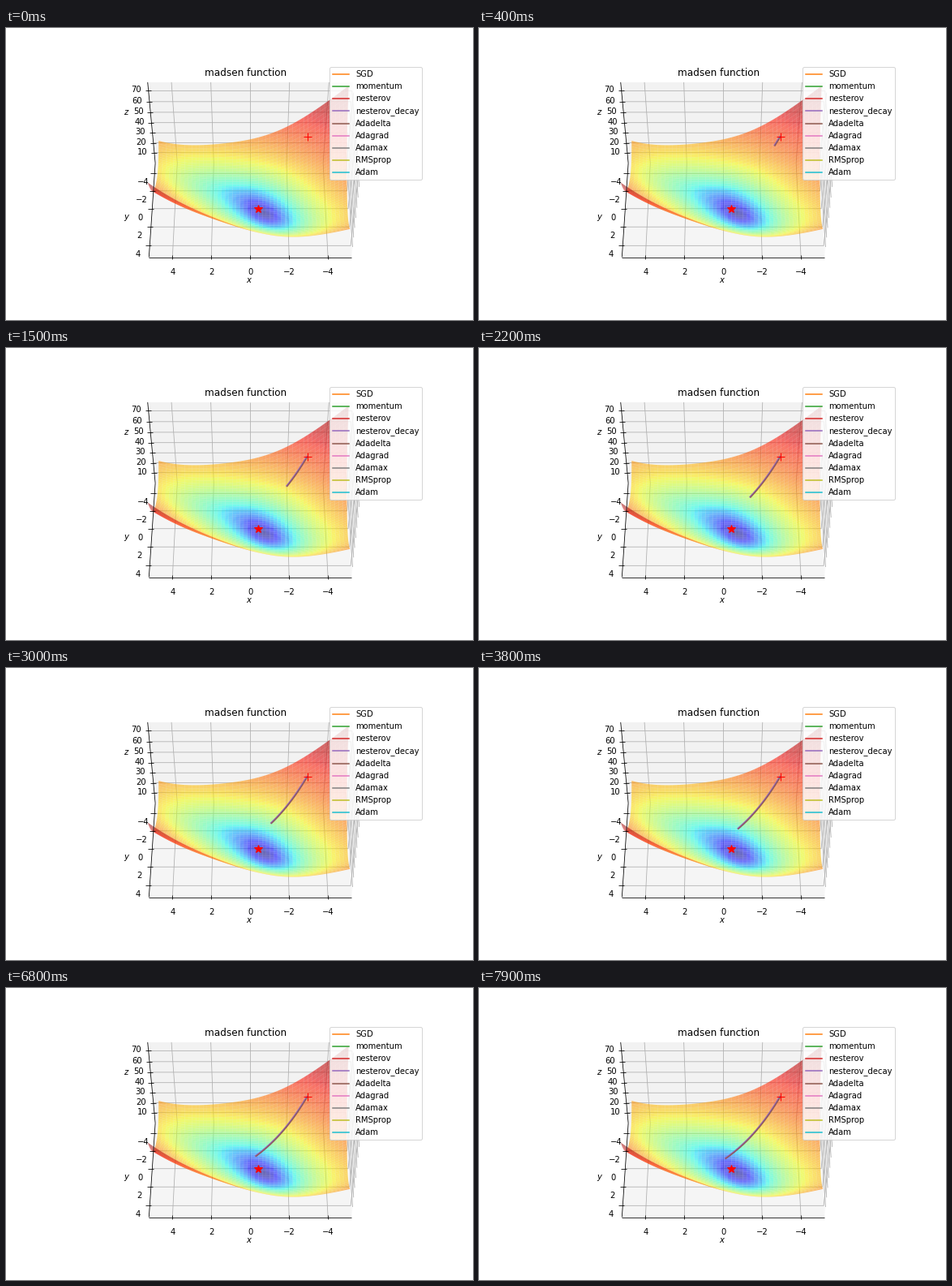
Recreate the animation shown at these times as a matplotlib script. Size 576 by 360 pixels, loop 8000 ms.

```python
import numpy as np
import matplotlib.pyplot as plt
from matplotlib.animation import FuncAnimation
from matplotlib.collections import LineCollection, PolyCollection
from matplotlib.colors import LogNorm
from matplotlib.lines import Line2D

W, H, DPI = 576, 360, 72
FRAMES, STEP = 80, 100
plt.rcParams["font.family"] = "DejaVu Sans"
plt.rcParams["mathtext.fontset"] = "dejavusans"


def madsen(x, y):
    return x * x + y * y + x * y + np.sin(x) + np.cos(y)


# Perspective camera looking along the y axis from 50 degrees above
ELEV = np.radians(50)
COS, SIN = np.cos(ELEV), np.sin(ELEV)
Z_LO, Z_HI = 0.6, 76.2
EDGE = 5 + 10 / 48
BOTTOM = Z_LO - (Z_HI - Z_LO) / 48
TOP = Z_HI + (Z_HI - Z_LO) / 48


def project(x, y, z):
    """Data point to stage pixels and distance from the camera."""
    u, v = -np.asarray(x) / 10, np.asarray(y) / 10
    w = (np.asarray(z) - Z_LO) / (Z_HI - Z_LO) - 0.5
    depth = 10 - (v * COS + w * SIN)
    px = 301.2 + 2413 * u / depth
    py = 175.43 - 1469.2 * (w * COS - v * SIN) / depth
    return px, py, depth


def line3(*points):
    return [project(*p)[:2] for p in points]


fig = plt.figure(figsize=(W / DPI, H / DPI), dpi=DPI, facecolor="white")
ax = fig.add_axes([0, 0, 1, 1])
ax.set_xlim(0, W)
ax.set_ylim(H, 0)
ax.axis("off")

# Panes
L, R, BACK, FRONT = EDGE, -EDGE, -EDGE, EDGE
panes = [
    line3((L, BACK, TOP), (R, BACK, TOP), (R, BACK, BOTTOM), (L, BACK, BOTTOM)),
    line3((L, BACK, BOTTOM), (R, BACK, BOTTOM), (R, FRONT, BOTTOM), (L, FRONT, BOTTOM)),
    line3((R, BACK, TOP), (R, FRONT, TOP), (R, FRONT, BOTTOM), (R, BACK, BOTTOM)),
]
greys = [(g, g, g, 0.5) for g in (0.9, 0.925, 0.95)]
ax.add_collection(PolyCollection(panes, facecolors=greys, edgecolors="none", zorder=1))

# Grid
xy_ticks = range(-4, 5, 2)
z_ticks = range(10, 71, 10)
grid = [line3((x, BACK, TOP), (x, BACK, BOTTOM), (x, FRONT, BOTTOM)) for x in xy_ticks]
grid += [line3((L, y, BOTTOM), (R, y, BOTTOM), (R, y, TOP)) for y in xy_ticks]
grid += [line3((L, BACK, z), (R, BACK, z), (R, FRONT, z)) for z in z_ticks]
ax.add_collection(LineCollection(grid, colors="#b0b0b0", linewidths=0.8, zorder=2))

# Surface, painted from far to near
side = np.linspace(-5, 4.9, 51)
gx, gy = np.meshgrid(side, side)
gz = madsen(gx, gy)
px, py, depth = project(gx, gy, gz)


def corners(a):
    return np.stack([a[:-1, :-1], a[:-1, 1:], a[1:, 1:], a[1:, :-1]], -1).reshape(-1, 4)


order = np.argsort(-corners(depth).mean(1))
quads = np.stack([corners(px), corners(py)], -1)[order]
level = LogNorm(Z_LO, Z_HI)(corners(gz).mean(1)[order])
ax.add_collection(PolyCollection(
    quads, facecolors=plt.cm.jet(level, alpha=0.57), edgecolors="none",
    linewidths=0, antialiaseds=True, zorder=3))

# Axis lines, ticks and labels
axes = [line3((L, BACK, TOP), (L, BACK, BOTTOM)),
        line3((L, BACK, BOTTOM), (L, FRONT, BOTTOM)),
        line3((L, FRONT, BOTTOM), (R, FRONT, BOTTOM))]


def label(x, y, text, size=10):
    ax.text(x, y, text, fontsize=size, ha="center", va="center", zorder=6)


def minus(n):
    return str(n).replace("-", "\u2212")


for x in xy_ticks:
    tx, ty, _ = project(x, FRONT, BOTTOM)
    axes.append([(tx, ty - 3), (tx, ty + 2)])
    label(tx, 300.5, minus(x))
for y in xy_ticks:
    tx, ty, _ = project(L, y, BOTTOM)
    axes.append([(tx - 5, ty), (tx + 2, ty)])
    label(tx - 14.5, ty + 10.8, minus(y))
for z in z_ticks:
    tx, ty, _ = project(L, BACK, z)
    axes.append([(tx - 4, ty), (tx + 3, ty)])
    label(tx - 15, ty - 1, z)
ax.add_collection(LineCollection(axes, colors="black", linewidths=0.8, zorder=4))
label(300.5, 311, "$x$")
label(149, 234.5, "$y$")
label(149, 104, "$z$")
ax.text(295.2, 58.9, "madsen function", fontsize=12, ha="center", zorder=6)

# Start and optimum
start = project(-3, -4, madsen(-3, -4))[:2]
ax.plot(*start, "r+", ms=10, mew=1, zorder=5.5)
ax.plot(311, 223, "r*", ms=10, zorder=5.5)

# Legend
names = ["SGD", "momentum", "nesterov", "nesterov_decay", "Adadelta",
         "Adagrad", "Adamax", "RMSprop", "Adam"]
handles = [Line2D([], [], color=f"C{i}") for i in range(1, 10)]
legend = ax.legend(handles, names, loc="upper right", fontsize=10,
                   bbox_to_anchor=(518.4, 43.2), bbox_transform=ax.transData)
legend.set_zorder(7)

# Descent path: a smooth curve with a head that slows down
times = [0, 0.9, 2.2, 3.8, 5.4, 6.8, 7.9]
head_x = [start[0], 357, 335, 320, 312, 308.5, 304.5]
head_y = [start[1], 157, 184, 198, 205, 207.5, 210]
curve = np.poly1d(np.polyfit(np.array(head_x) - 340, head_y, 3))

under, = ax.plot([], [], color="C4", lw=2, zorder=5)
trail, = ax.plot([], [], color="C5", lw=1.5, alpha=0.85, zorder=5)


def draw(i):
    t = i * STEP / 1000
    x = np.linspace(start[0], np.interp(t, times, head_x), 60)
    y = curve(x - 340)
    under.set_data(x - 0.5, y - 0.5)
    trail.set_data(x, y)
    for line in (under, trail):
        line.set_visible(i > 0)
    return under, trail


anim = FuncAnimation(fig, draw, frames=FRAMES, interval=STEP,
                     repeat=True, repeat_delay=0)
plt.show()
```
